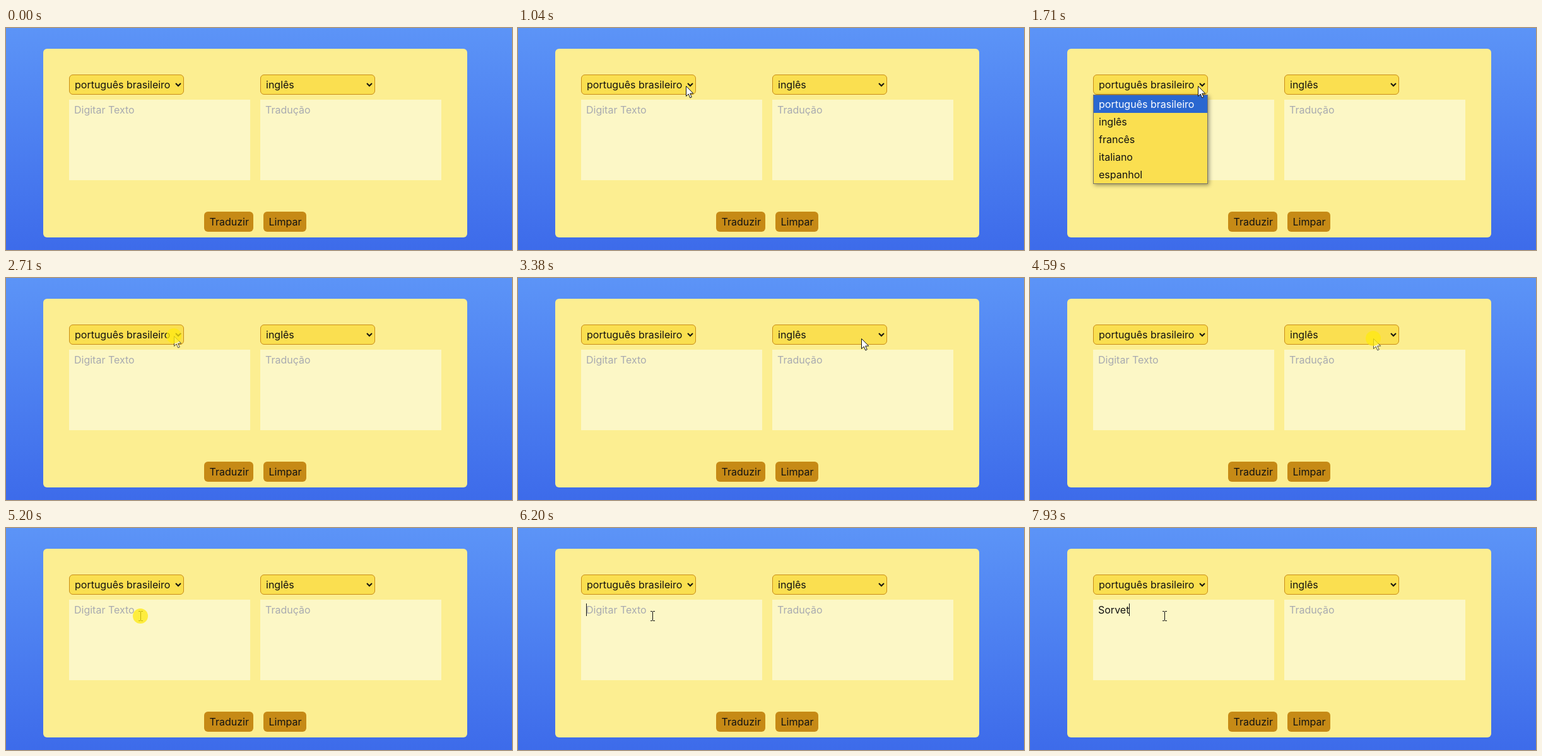
Recreate the animation shown at these times as an HTML page. Size 802 by 353 pixels, loop 7.99 s.

```html
<!DOCTYPE html>
<html lang="pt-BR">
<head>
<meta charset="utf-8">
<title>Tradutor</title>
<style>
  html, body { margin: 0; width: 100%; height: 100%; overflow: hidden; }
  svg { display: block; width: 802px; height: 353px; }
  text { font: 16px Inter, sans-serif; fill: #111; white-space: pre; }
  .hint { fill: #a8aab0; }
  .popup { filter: drop-shadow(2px 2px 3px rgba(0, 0, 0, .4)); }
</style>
</head>
<body>
<svg id="stage" viewBox="0 0 802 353" xmlns="http://www.w3.org/2000/svg"></svg>
<script>
const LOOP = 7990;
const LANGUAGES = ['português brasileiro', 'inglês', 'francês', 'italiano', 'espanhol'];
const LEFT = 100, RIGHT = 403;

const rect = (x, y, w, h, fill, extra = '') =>
  `<rect x="${x}" y="${y}" width="${w}" height="${h}" fill="${fill}" ${extra}/>`;
const label = (x, y, content, extra = '') => `<text x="${x}" y="${y}" ${extra}>${content}</text>`;

const select = (x, value) =>
  rect(x + .5, 74.5, 181, 31, '#fadf50', 'rx="5.5" stroke="#c98d18"') +
  label(x + 9, 96, value) +
  `<path d="M${x + 169} 88l4 4 4-4" fill="none" stroke="#111" stroke-width="2"/>`;

const area = (x, id, hint) =>
  rect(x, 114, 287, 128, '#fcf7c6') + label(x + 8, 136, hint, `id="${id}" class="hint"`);

const button = (x, w, name) => rect(x, 292, w, 32, '#c68a16', 'rx="6"') + label(x + 8.5, 314, name);

const popup = (x, id, chosen) =>
  `<g id="${id}" class="popup">` +
  rect(x + .5, 106.5, 181, 141, '#fadf50', 'stroke="#77736a"') +
  rect(x + 1, 107, 180, 28, '#2a67d0', `transform="translate(0 ${28 * chosen})"`) +
  LANGUAGES.map((name, i) =>
    label(x + 9, 127 + 28 * i, name, i === chosen ? 'style="fill:#fff"' : '')).join('') +
  '</g>';

const stage = document.getElementById('stage');
stage.innerHTML =
  `<defs><linearGradient id="sky" x2="0" y2="1">
    <stop stop-color="#5c94f7"/><stop offset="1" stop-color="#3d6bea"/>
  </linearGradient></defs>` +
  rect(0, 0, 802, 353, 'url(#sky)') +
  rect(59, 33, 672, 300, '#fcee91', 'rx="6"') +
  select(LEFT, LANGUAGES[0]) + select(RIGHT, LANGUAGES[1]) +
  area(LEFT, 'hint', 'Digitar Texto') + area(RIGHT, 'result', 'Tradução') +
  button(314, 78, 'Traduzir') + button(408, 68, 'Limpar') +
  label(108, 136, '', 'id="typed"') +
  rect(108, 120, 1, 20, '#111', 'id="caret"') +
  popup(LEFT, 'fromList', 0) + popup(RIGHT, 'toList', 1) +
  `<g id="pointer">
    <path id="arrow" d="M.5 .5V16.5L4.2 13L6.8 19L9.3 17.9L6.7 12.1H11.8Z" fill="#fff" stroke="#111"/>
    <path id="beam" d="M-3 -7.5H0M1 -7.5H4M.5 -7V7M-3 7.5H0M1 7.5H4" fill="none" stroke="#111"/>
  </g>
  <circle id="click" r="12" fill="#ffea10" fill-opacity=".75"/>`;

const $ = Object.fromEntries([...stage.querySelectorAll('[id]')].map(el => [el.id, el]));

// Pointer journeys; sag bends the path downwards.
const MOVES = [
  { start: 210, end: 970, steps: 11, from: [582, 347], to: [266, 93], sag: 0 },
  { start: 1040, end: 1041, steps: 1, from: [266, 92], to: [266, 92], sag: 0 },
  { start: 2980, end: 3380, steps: 6, from: [266, 92], to: [544, 96], sag: 16 },
  { start: 4590, end: 5000, steps: 6, from: [544, 96], to: [213, 140], sag: 0 },
];
const CLICKS = [[1570, 1710], [2710, 2840], [3590, 3720], [4590, 4720], [5200, 5260]];
const KEYS = [6670, 7010, 7200, 7470, 7600, 7930];
const WORD = 'Sorvet';

const within = (t, a, b) => t >= a && t < b;
const show = (el, on) => el.setAttribute('visibility', on ? 'visible' : 'hidden');
const ease = u => .5 * u + .5 * u * u * (3 - 2 * u);

function pointerAt(t) {
  const move = MOVES.filter(m => t >= m.start).pop();
  if (!move) return null;
  const { start, end, steps, from, to, sag } = move;
  const raw = Math.min(1, (t - start) / (end - start));
  const u = ease(Math.floor(raw * steps + .05) / steps);
  return [
    Math.round(from[0] + (to[0] - from[0]) * u),
    Math.round(from[1] + (to[1] - from[1]) * u + sag * Math.sin(Math.PI * u)),
  ];
}

const overText = ([x, y]) =>
  y >= 114 && y < 242 && [LEFT, RIGHT].some(left => x >= left && x < left + 287);

function draw(t) {
  const at = pointerAt(t);
  const clicking = CLICKS.some(([a, b]) => within(t, a, b));
  show($.arrow, at && !overText(at));
  show($.beam, at && overText(at));
  show($.click, at && clicking);
  if (at) {
    const place = `translate(${at})`;
    $.pointer.setAttribute('transform', place);
    $.click.setAttribute('transform', place);
  }
  // The pointer is still fading in as a list closes.
  const closing = within(t, 2710, 2840) || within(t, 4590, 4650);
  $.pointer.setAttribute('opacity', closing ? .7 : 1);

  show($.fromList, within(t, 1710, 2710));
  show($.toList, within(t, 3720, 4590));

  const typed = WORD.slice(0, KEYS.filter(k => t >= k).length);
  if ($.typed.textContent !== typed) $.typed.textContent = typed;
  show($.hint, !typed);
  show($.caret, t >= 5260 && !within(t, 5730, 6200));
  const width = typed ? $.typed.getComputedTextLength() : 0;
  $.caret.setAttribute('x', 108 + Math.floor(width));
}

const begin = performance.now();
function tick() {
  draw((performance.now() - begin) % LOOP);
  requestAnimationFrame(tick);
}
tick();
</script>
</body>
</html>
```
